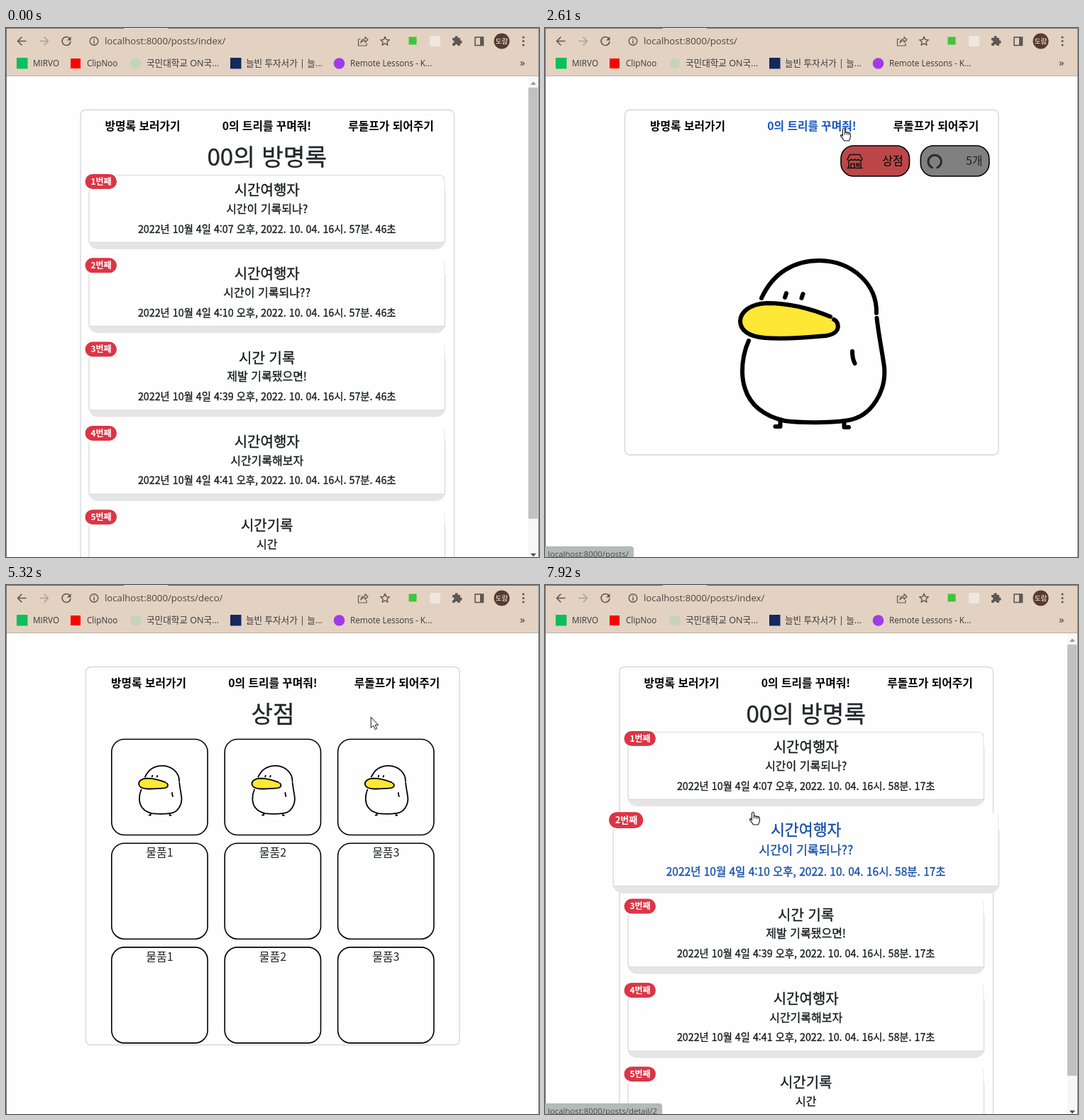
An HTML page for the animation above (8 s loop, 751x746 px).

```html
<!DOCTYPE html>
<html lang="ko">
<head>
<meta charset="utf-8">
<style>
  html, body { margin: 0; width: 100%; height: 100%; overflow: hidden; background: #fefefe; }
  svg { display: block; width: 751px; height: 746px; color: #212529; }
  text { font-family: "Noto Sans CJK KR", "Noto Sans CJK", sans-serif; white-space: pre; }
  .ui { font-family: "Open Sans", "Noto Sans CJK KR", sans-serif; }
  .medium { fill: currentColor; stroke: currentColor; stroke-width: 0.3px; }
  .line { fill: none; stroke-linecap: round; stroke-linejoin: round; }
</style>
</head>
<body>
<svg id="stage" viewBox="0 0 751 746" xmlns="http://www.w3.org/2000/svg"></svg>
<script>
const LOOP = 8000, BLUE = '#1555c0', INK = '#212529', ICON = '#5d5853';
const stage = document.getElementById('stage');
const $ = id => document.getElementById(id);

const text = (x, y, size, str, attrs = '') =>
  `<text x="${x}" y="${y}" font-size="${size}" ${attrs}>${str}</text>`;
const centered = (x, y, size, str, attrs = '') => text(x, y, size, str, `text-anchor="middle" ${attrs}`);
const rect = (x, y, w, h, r, attrs) =>
  `<rect x="${x}" y="${y}" width="${w}" height="${h}" rx="${r}" ${attrs}/>`;
const circle = (x, y, r, attrs) => `<circle cx="${x}" cy="${y}" r="${r}" ${attrs}/>`;
const line = (d, width = 1.6, color = ICON) =>
  `<path class="line" d="${d}" stroke="${color}" stroke-width="${width}"/>`;

// Browser chrome
function toolbar() {
  const label = (x, str, size = 11.7) => text(x, 54, size, str, 'class="ui" fill="#3b3836"');
  const dots = [13, 18.5, 24].map(y => circle(729, y, 1.6, `fill="${ICON}"`)).join('');
  return rect(0, 0, 751, 67, 0, 'fill="#e3d2c2"')
    + rect(0, 67, 751, 1, 0, 'fill="#b9afa6"')
    + line('M28 18.5H16.5M22 13L16.5 18.5L22 24')
    + line('M48 18.5H59.5M54 13L59.5 18.5L54 24', 1.6, '#aba198')
    + `<g id="reload">${line('M90 15A6 6 0 1 0 91 19.5')}<path d="M91.5 12V17.5H86Z" fill="${ICON}"/></g>`
    + `<g id="stop">${line('M80.5 13.5L90 23M90 13.5L80.5 23')}</g>`
    + circle(124, 18.5, 5.8, `fill="none" stroke="${ICON}" stroke-width="1.4"`)
    + line('M124 18V21.5M124 15.6V15.7', 1.5)
    + text(139, 23.3, 13.2, '', 'id="url" class="ui" fill="#4a4643"')
    + line('M499 15.5H496.5V25H508V21.5M500 21C500.5 17 503 15.3 506 15.3V12.5L510 16.5L506 20.3V17.6C503.5 17.6 501.5 18.5 500 21Z', 1.2)
    + line('M534 12.2L535.8 16.4L540.3 16.8L536.9 19.8L537.9 24.2L534 21.9L530.1 24.2L531.1 19.8L527.7 16.8L532.2 16.4Z', 1.4)
    + rect(567.5, 12.5, 11, 11, 0, 'fill="#3cc63c"')
    + rect(597, 11, 15, 15, 2, 'fill="#eee6df"')
    + `<path d="M629 14H632.5A2.2 2.2 0 1 1 636.8 14H640V17.5A2.2 2.2 0 1 1 640 21.8V25H636.5A2 2 0 1 0 632.5 25H629V21.3A2 2 0 1 0 629 17.4Z" fill="${ICON}"/>`
    + rect(661, 13, 11.5, 11.5, 0, `fill="none" stroke="${ICON}" stroke-width="1.6"`)
    + rect(668, 13, 5, 11.5, 0, `fill="${ICON}"`)
    + circle(698.5, 18.5, 11, 'fill="#583a31"')
    + centered(698.5, 22, 9.5, '도람', 'fill="#fff"') + dots
    + rect(15, 42, 15.5, 15.5, 0, 'fill="#0bbf5c"') + label(38, 'MIRVO')
    + rect(91, 43, 14, 14, 0, 'fill="#f00"') + label(114, 'ClipNoo')
    + circle(183, 50, 7.8, 'fill="#c5d3bd"') + label(198, '국민대학교 ON국...', 12.6)
    + rect(316, 42, 15.5, 15.5, 0, 'fill="#14295f"') + label(338, '늘빈 투자서가 | 늘...', 12.6)
    + circle(469.5, 50, 7.8, 'fill="#a03be8"') + label(485, 'Remote Lessons - K...')
    + label(724, '»', 15)
    + rect(0, 0, 751, 1, 0, 'fill="#77706a"') + rect(166, 0, 62, 1, 0, 'fill="#e8ddd3"')
    + rect(0, 0, 1, 746, 0, 'fill="#6f6f6f"') + rect(750, 0, 1, 746, 0, 'fill="#8c8c8c"');
}

// Shared page parts
const panel = (x, height) =>
  rect(x, 115.5, 526.5, height, 7, 'fill="none" stroke="#d3d8e0" stroke-width="1.4"');
const nav = ['방명록 보러가기', '0의 트리를 꾸며줘!', '루돌프가 되어주기']
  .map((s, i) => centered(192.5 + 175 * i, 144.3, 15.75, s, 'class="nav" font-weight="700"')).join('');
const heading = (x, str) => centered(x, 193.6, 33.25, str, 'class="medium"');

// Guestbook page
const entries = [
  ['시간여행자', '시간이 기록되나?', '4:07'],
  ['시간여행자', '시간이 기록되나??', '4:10'],
  ['시간 기록', '제발 기록됐으면!', '4:39'],
  ['시간여행자', '시간기록해보자', '4:41'],
  ['시간기록', '시간', '4:42'],
];
const cardStep = 118.3;

function card([title, body, time], i) {
  const topEdge = i ? '' : line('M119 213Q119 207.5 126 207.5H610Q617.5 207.5 617.5 214', 1, '#dcdcdc');
  return `<g transform="translate(0 ${i * cardStep})"><g class="zoom">`
    + rect(116, 219, 503.5, 93, 14, 'fill="#e5e5e5"')
    + rect(118, 207.5, 500, 94.5, 3, 'fill="#fefefe"')
    + line('M118 302.3H618', 1, '#d8d8d8') + line('M617.8 210V302', 0.8, '#e2e2e2') + topEdge
    + `<g class="words medium">`
    + centered(367.7, 236.2, 20, title)
    + centered(367.7, 260.8, 16, body)
    + centered(367.7, 288.6, 14.3, '', `class="date" data-time="${time}"`)
    + `</g>` + rect(111.5, 206, 44.5, 21, 10.5, 'fill="#dc3545"')
    + centered(134, 220.9, 12, `${i + 1}번째`, 'font-weight="700" fill="#fff"')
    + `</g></g>`;
}

const scrollbar = rect(736, 68, 14, 678, 0, 'fill="#f7f7f7"')
  + rect(736, 84, 13.5, 608, 0, 'fill="#c1c1c1"')
  + '<path d="M739 80L743 75.5L747 80Z" fill="#999"/><path d="M739 741L743 745.5L747 741Z" fill="#505050"/>';
const guestbook = panel(105, 700) + nav + heading(367.7, '00의 방명록')
  + entries.map(card).join('') + scrollbar;

// Tree page
const duck = `<g class="line" stroke="#000" stroke-width="6">
  <path d="M305 381C322 344 352 328 387 328C434 329 468 362 467 402"/>
  <path d="M467.5 409C470 432 475 456 478 478C481 511 461 549 425 553.5C400 557 360 557 338 554C299 545 279 522 278 485C278 468 282 452 287 441"/>
  <path fill="#ffe735" d="M402 407C375 396 345 388 313 388C288 389 275 401 275 414C276 428 288 435 310 437C340 439 375 436 396 434C410 432 414 425 412.5 418C411.5 414 409.5 412 407 411"/>
  <path d="M340 374L338 380M363.5 375L361.5 381M433 456C433 464 434 468 436.5 473M331.5 554V562H324.5M421.5 555V563H428"/></g>`;
const button = (x, fill) => rect(x, 166, 96.5, 43, 18, `fill="${fill}" stroke="#000" stroke-width="1.6"`);
const shopIcon = line('M429.5 178.5H443.5L447 185A2.9 2.9 0 0 1 441.5 185A2.9 2.9 0 0 1 436.5 185A2.9 2.9 0 0 1 431.5 185A2.9 2.9 0 0 1 426 185ZM428 188.5V197.5M445 188.5V197.5M426 197.5H447M431 197V191.5H436V197M439 191.5H442.5V194.5H439Z', 1.5, '#111');
const tree = panel(112.5, 486.5) + `<g transform="translate(8.5 0)">${nav}</g>`
  + button(417, '#bb4748') + shopIcon + centered(490, 193.3, 16, '상점')
  + button(529.3, '#808080') + line('M545.5 196.8A9.2 9.2 0 1 1 552.8 196.8', 3, '#2b2b2b')
  + centered(604.7, 193.3, 16, '5개', 'fill="#222"') + duck;

// Shop page
let shop = panel(112.5, 533) + `<g transform="translate(8.5 0)">${nav}</g>` + heading(376, '상점');
for (let row = 0; row < 3; row++) for (let col = 0; col < 3; col++) {
  const x = 148.8 + 159.4 * col, y = 217.5 + 146.7 * row;
  shop += rect(x, y, 135.3, 135, 18, 'fill="none" stroke="#000" stroke-width="1.6"');
  shop += row
    ? centered(x + 67.7, y + 18.8, 16, `물품${col + 1}`, `fill="${INK}"`)
    : `<g transform="translate(${105.2 + 159.4 * col} 157.3) scale(.2975)">${duck}</g>`;
}

const hand = `<g id="hand"><path d="M-1.5 1.5Q0-1 1.5 1.5V6Q3 5 4.3 6.4Q5.8 5.6 7 7Q9 6.4 9.3 8.4V12.5Q9 15.5 7.5 18H.5Q-1 15.5-3.8 12.2Q-5.5 9.6-3.2 9.6L-1.5 11.2Z"
  fill="#fff" stroke="#112" stroke-width="1.1"/>${line('M1.5 6V9M4.3 6.5V9.3M7 7V9.5', 1, '#112')}</g>`;
const arrow = '<path id="arrow" d="M0 0V15L3.5 11.8L6 17.2L8.4 16.2L6 11H10.5Z" fill="#fff" stroke="#112"/>';

stage.innerHTML = rect(0, 0, 751, 746, 0, 'fill="#fefefe"')
  + `<g id="index">${guestbook}</g><g id="tree">${tree}</g><g id="shop">${shop}</g>` + toolbar()
  + `<g id="status"><rect id="bubble" x="-4" y="731" height="20" rx="4" fill="#b3bab7"/>`
  + text(4, 745.7, 11.4, '', 'id="link" class="ui" fill="#474c4a"') + `</g><g id="cursor">${hand}${arrow}</g>`;

// Timeline: each list holds [start time, value]
const pages = [[0, 'index', 'index/'], [2610, 'tree', ''], [4260, 'shop', 'deco/'], [6770, 'index', 'index/']];
const navHover = [[0, -1], [1140, 1], [1420, -1], [1750, 1], [3430, -1], [5400, 2], [5780, 1], [6240, 0], [7000, -1]];
const links = [[0, null], [320, 'detail/2'], [660, 'detail/1'], [1140, ''], [3020, null], [3540, 'deco/'],
  [4680, null], [5780, ''], [6240, 'index/'], [7190, 'detail/1'], [7802, 'detail/2']];
const pointers = [[0, 'none'], [320, 'hand'], [1420, 'arrow'], [1700, 'hand'], [4680, 'arrow'], [5400, 'hand']];
const cardHover = [[[660, 1040], [7190, 7720]], [[320, 660], [7802, 9000]]];
const path = [[320, 300, 372], [1040, 352, 215], [1140, 366, 150], [1240, 372, 142], [1440, 455, 140],
  [1650, 455, 140], [1960, 421, 141], [3230, 421, 141], [3330, 421, 149], [3940, 479, 193], [4580, 479, 193],
  [4790, 503, 205], [5220, 503, 205], [5600, 545, 135], [5940, 345, 131], [6140, 323, 129], [6340, 243, 140],
  [6880, 243, 140], [7510, 283, 285], [7720, 283, 285], [7920, 293, 320]];

const at = (list, t) => list.findLast(item => item[0] <= t) || list[0];
const clamp = v => Math.min(1, Math.max(0, v));
const ease = v => 1 - (1 - clamp(v)) ** 2;
const show = (id, on) => $(id).setAttribute('display', on ? 'inline' : 'none');
const mix = (a, b, k) => `rgb(${a.map((v, i) => Math.round(v + (b[i] - v) * k))})`;

function pointerAt(t) {
  const from = at(path, t), to = path[path.indexOf(from) + 1] || from;
  const k = to === from ? 0 : clamp((t - from[0]) / (to[0] - from[0]));
  return [1, 2].map(i => from[i] + (to[i] - from[i]) * k);
}

const hoverAmount = (spans, t) => Math.max(0, ...(spans || []).map(([a, b]) =>
  t < a ? 0 : t < b ? ease((t - a) / 200) : 1 - ease((t - b) / 200)));

const navItems = [...stage.querySelectorAll('.nav')];
const dates = [...stage.querySelectorAll('.date')];
const zooms = [...stage.querySelectorAll('.zoom')];

function draw(t) {
  const [, page, slug] = at(pages, t);
  ['index', 'tree', 'shop'].forEach(id => show(id, id === page));
  $('url').textContent = 'localhost:8000/posts/' + slug;
  const loading = (t >= 320 && t < 420) || (t >= 6770 && t < 6880);
  show('reload', !loading);
  show('stop', loading);

  const active = at(navHover, t)[1];
  navItems.forEach((el, i) => el.setAttribute('fill', i % 3 === active ? BLUE : '#000'));

  const clock = t < 6770 ? '57분. 46초' : '58분. 17초';
  dates.forEach(el => {
    el.textContent = `2022년 10월 4일 ${el.dataset.time} 오후, 2022. 10. 04. 16시. ${clock}`;
  });
  zooms.forEach((el, i) => {
    const k = hoverAmount(cardHover[i], t);
    el.setAttribute('transform', `translate(367.7 255.7) scale(${1 + 0.1 * k}) translate(-367.7 -255.7)`);
    el.querySelector('.words').style.color = mix([22, 24, 27], [18, 86, 196], k);
  });

  const link = at(links, t)[1];
  show('status', link !== null);
  if (link !== null) {
    $('link').textContent = 'localhost:8000/posts/' + link;
    $('bubble').setAttribute('width', $('link').getComputedTextLength() + 15);
  }

  const pointer = at(pointers, t)[1];
  show('hand', pointer === 'hand');
  show('arrow', pointer === 'arrow');
  $('cursor').setAttribute('transform', `translate(${pointerAt(t)})`);
}

const start = performance.now();
function tick() {
  draw((performance.now() - start) % LOOP);
  requestAnimationFrame(tick);
}
tick();
</script>
</body>
</html>
```
